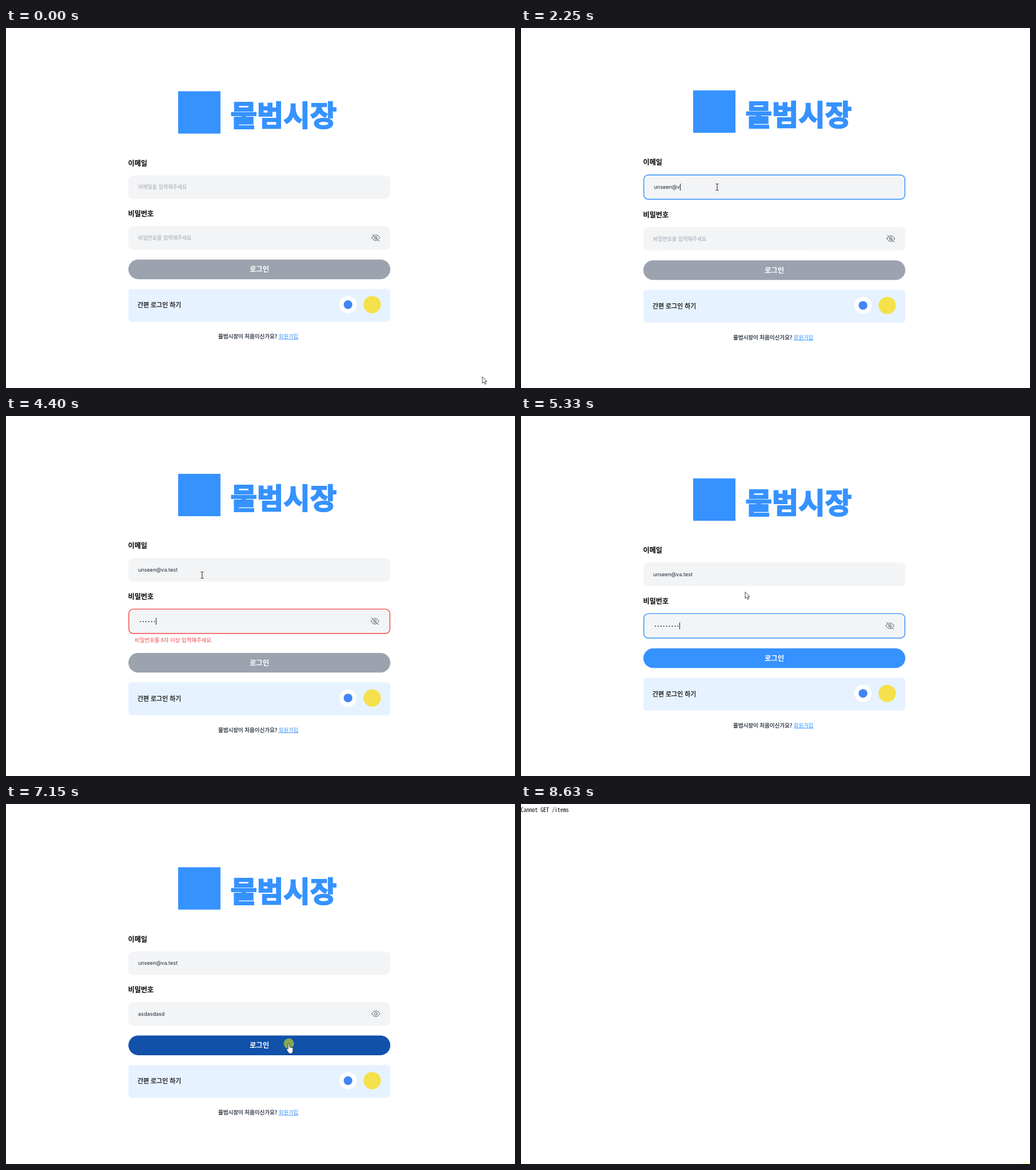
An HTML page for the animation above (8.7 s loop, 890x629 px).

```html
<!DOCTYPE html>
<html lang="ko">
<head>
<meta charset="utf-8">
<title>로그인</title>
<style>
  html, body { margin: 0; width: 100%; height: 100%; overflow: hidden; background: #fff; }
  svg { display: block; width: 890px; height: 629px; }
  text { font-family: "Noto Sans CJK KR", "Noto Sans CJK", sans-serif; fill: #000; white-space: pre; }
  .brand { font-size: 50.5px; font-weight: 900; fill: #3692ff; stroke: #3692ff; stroke-width: 2; }
  .label { font-size: 12.1px; font-weight: 700; }
  .hint { font-size: 9px; fill: #9ca3af; }
  .typed { font-family: Inter, sans-serif; font-size: 9.1px; fill: #1f2937; }
  .error { font-size: 9.4px; font-weight: 500; fill: #f74747; }
  .login { font-size: 12.3px; font-weight: 700; fill: #fff; }
  .easy { font-size: 10.9px; font-weight: 500; stroke: #000; stroke-width: .25; }
  .join { font-size: 9.5px; font-weight: 500; fill: #1f2937; stroke: #1f2937; stroke-width: .25; }
  .link { font-size: 9.4px; font-weight: 500; fill: #3692ff; text-decoration: underline; }
  .plain { font-family: "Noto Sans Mono CJK KR", "Noto Sans Mono", monospace; font-size: 9.9px; }
  .field { fill: #f3f4f6; }
  .eye { fill: none; stroke: #4b5563; stroke-linecap: round; }
  .pointer { fill: #fff; stroke: #111; stroke-width: .8; stroke-linejoin: round; }
</style>
</head>
<body>
<svg viewBox="0 0 890 629">
  <g id="page">
    <g id="head">
      <rect x="301" y="110.5" width="74" height="74" fill="#3692ff"/>
      <text class="brand" x="392.4" y="171.2">물범시장</text>
      <text class="label" x="213.5" y="240.8">이메일</text>
    </g>
    <g id="email"></g>
    <g id="mid"><text class="label" x="213.5" y="329.4">비밀번호</text></g>
    <g id="pass"></g>
    <text id="error" class="error" x="225"></text>
    <g id="foot">
      <rect id="button" x="214" y="404.5" width="458" height="34.4" rx="17.2"/>
      <text class="login" x="443" y="426.2" text-anchor="middle">로그인</text>
      <rect x="214" y="456" width="458" height="57.2" rx="5.7" fill="#e6f2ff"/>
      <text class="easy" x="230" y="488.1">간편 로그인 하기</text>
      <circle cx="598" cy="483.3" r="15.1" fill="#fff"/>
      <circle cx="598" cy="483.3" r="7.6" fill="#4285f4"/>
      <circle cx="640.3" cy="483.3" r="15.1" fill="#f5e14b"/>
      <text class="join" x="371" y="542.4">물범시장이 처음이신가요?</text>
      <text class="link" x="476.7" y="542.4">회원가입</text>
    </g>
    <g id="eye" class="eye">
      <path d="M-7 0C-5-3.3-2.6-4.9 0-4.9S5-3.3 7 0C5 3.3 2.6 4.9 0 4.9S-5 3.3-7 0Z"/>
      <circle r="2.3"/>
      <g id="slash">
        <path d="M-5-6.4L7.2 5.7" stroke="#f3f4f6"/>
        <path d="M-6-6L6.2 6.2"/>
      </g>
    </g>
  </g>
  <text id="missing" class="plain" x="-.4" y="13.7">Cannot GET /items</text>
  <circle id="glow" r="9" fill="#ff0" fill-opacity=".5"/>
  <g id="cursor">
    <path id="arrow" class="pointer" d="M0 .4V11.8L2.7 9.4L4.6 13.4L6.3 12.7L4.6 8.7H7.9Z"/>
    <path id="beam" d="M-2.5-5.5H-.6L0-5L.6-5.5H2.5M0-5V5M-2.5 5.5H-.6L0 5L.6 5.5H2.5" fill="none" stroke="#222"/>
    <path id="hand" class="pointer" d="M-1.3 9V.8a1.3 1.3 0 0 1 2.6 0V5.6L6 6.8Q7.7 7.3 7.6 9L7 13.5L5.8 17H.5L-3.7 11Q-4.2 9.4-2.9 8.8Z"/>
  </g>
</svg>
<script>
const LOOP = 8700, BORDER = 2.86, NOTE = 16, DOT = 4.94;
const EMAIL = 'unseen@va.test', PASSWORD = 'asdasdasd';
const emailKeys = [780, 850, 910, 1120, 1190, 1260, 1720, 2250, 2320, 2460, 2790, 3070, 3190, 3330];
const passKeys = [3860, 3960, 4060, 4260, 4330, 4400, 4660, 4790, 4860];
const focusEmail = 530, focusPass = 3460, blur = 5950, reveal = 6080, leave = 7420;
const presses = [[530, 600], [5950, 6080], [7150, 7290]];

// first step, last step, number of steps, end point
const moves = [
  [70, 460, 6, 343, 278], [5330, 5330, 1, 392, 307], [5390, 5390, 1, 470, 434],
  [5540, 5890, 6, 643.5, 358], [6270, 7080, 13, 494.5, 419], [7630, 7700, 2, 590, 420],
  [7890, 7890, 1, 650, 408], [7960, 8030, 2, 850, 555]
];

const $ = id => document.getElementById(id);
const show = (el, on) => el.setAttribute('display', on ? 'inline' : 'none');
const shift = (el, x, y) => el.setAttribute('transform', `translate(${x} ${y})`);
const set = (el, attrs) => { for (const k in attrs) el.setAttribute(k, attrs[k]); };
const count = (keys, t) => keys.filter(k => k <= t).length;
const within = (t, [a, b]) => t >= a && t < b;

function make(parent, tag, attrs = {}) {
  const el = document.createElementNS('http://www.w3.org/2000/svg', tag);
  set(el, attrs);
  return parent.appendChild(el);
}

function makeField(group, hint) {
  const box = make(group, 'rect', { class: 'field', 'stroke-width': BORDER / 2 });
  const text = make(group, 'text');
  const dots = make(group, 'g', { fill: '#1f2937' });
  for (let i = 0; i < PASSWORD.length; i++) make(dots, 'circle', { cx: DOT * (i + .5), r: .95 });
  const caret = make(group, 'rect', { width: 1, height: 12, fill: '#222' });

  return (y, value, focused, bad, masked) => {
    const edge = focused ? BORDER / 2 : 0;
    const h = 41.2 + 2 * edge, mid = y + h / 2, x = 231 + edge;
    set(box, {
      x: 214 + edge / 2, y: y + edge / 2, width: 458 - edge, height: h - edge, rx: 8.6 - edge / 2,
      stroke: !focused ? 'none' : bad ? '#f74747' : '#3692ff'
    });
    text.textContent = value ? (masked ? '' : value) : hint;
    set(text, { class: value ? 'typed' : 'hint', x, y: mid + 3.4 });
    show(dots, masked);
    shift(dots, x, mid + .6);
    [...dots.children].forEach((d, i) => show(d, i < value.length));
    const w = !value ? 0 : masked ? value.length * DOT : text.getComputedTextLength();
    set(caret, { x: Math.round(x + w), y: mid - 6 });
    show(caret, focused);
    return { mid, bottom: y + h };
  };
}

const drawEmail = makeField($('email'), '이메일을 입력해주세요');
const drawPass = makeField($('pass'), '비밀번호를 입력해주세요');

function pointerAt(t) {
  let x = 833, y = 609;
  for (const [a, b, n, tx, ty] of moves) {
    if (t < a) break;
    const gap = n > 1 ? (b - a) / (n - 1) : 1;
    const p = Math.min(n, Math.floor((t - a) / gap + 1e-6) + 1) / n;
    x += (tx - x) * p;
    y += (ty - y) * p;
  }
  return [x, y];
}

function render(t) {
  const open = t < leave;
  const mail = EMAIL.slice(0, count(emailKeys, t));
  const pass = PASSWORD.slice(0, count(passKeys, t));
  const onMail = t >= focusEmail && t < focusPass;
  const onPass = t >= focusPass && t < blur;
  const badMail = onMail && mail !== '' && !/^\w+@\w+(\.\w+)*$/.test(mail);
  const badPass = onPass && pass !== '' && pass.length < 8;
  const ready = pass.length >= 8;
  const grow = ((onMail || onPass ? BORDER : 0) + (badMail || badPass ? NOTE : 0)) / 2;
  const middle = onMail ? grow : -grow;
  const shown = t >= reveal;
  const [x, y] = pointerAt(t);
  const pressed = presses.some(p => within(t, p));

  show($('page'), open);
  show($('missing'), !open);
  shift($('head'), 0, -grow);
  shift($('mid'), 0, middle);
  shift($('foot'), 0, grow);
  const first = drawEmail(257.4 - grow, mail, onMail, badMail, false);
  const second = drawPass(346.1 + middle, pass, onPass, badPass, pass !== '' && !shown);
  shift($('eye'), onPass ? 645.2 : 646.6, second.mid - .2);
  show($('slash'), !shown);

  $('error').textContent = badMail ? '잘못된 이메일 형식입니다.'
    : badPass ? '비밀번호를 8자 이상 입력해주세요.' : '';
  set($('error'), { y: (badMail ? first : second).bottom + 14 });

  const inside = open && x > 214 && x < 672;
  const hover = inside && ready && y > 404 && y < 441;
  $('button').setAttribute('fill', !ready ? '#9ca3af' : !hover ? '#3692ff' : pressed ? '#1251aa' : '#1967d6');

  const beam = inside && x < 636 && (within(y, [256, 300]) || within(y, [345, 389]));
  show($('cursor'), t < 8100);
  shift($('cursor'), x, y);
  show($('beam'), beam);
  show($('hand'), hover);
  show($('arrow'), !beam && !hover);

  const last = t >= 8630;
  show($('glow'), pressed || last);
  shift($('glow'), last ? 882 : x, last ? 636 : y - .5);
}

const start = performance.now();
function tick() {
  render((performance.now() - start) % LOOP);
  requestAnimationFrame(tick);
}
tick();
</script>
</body>
</html>
```
